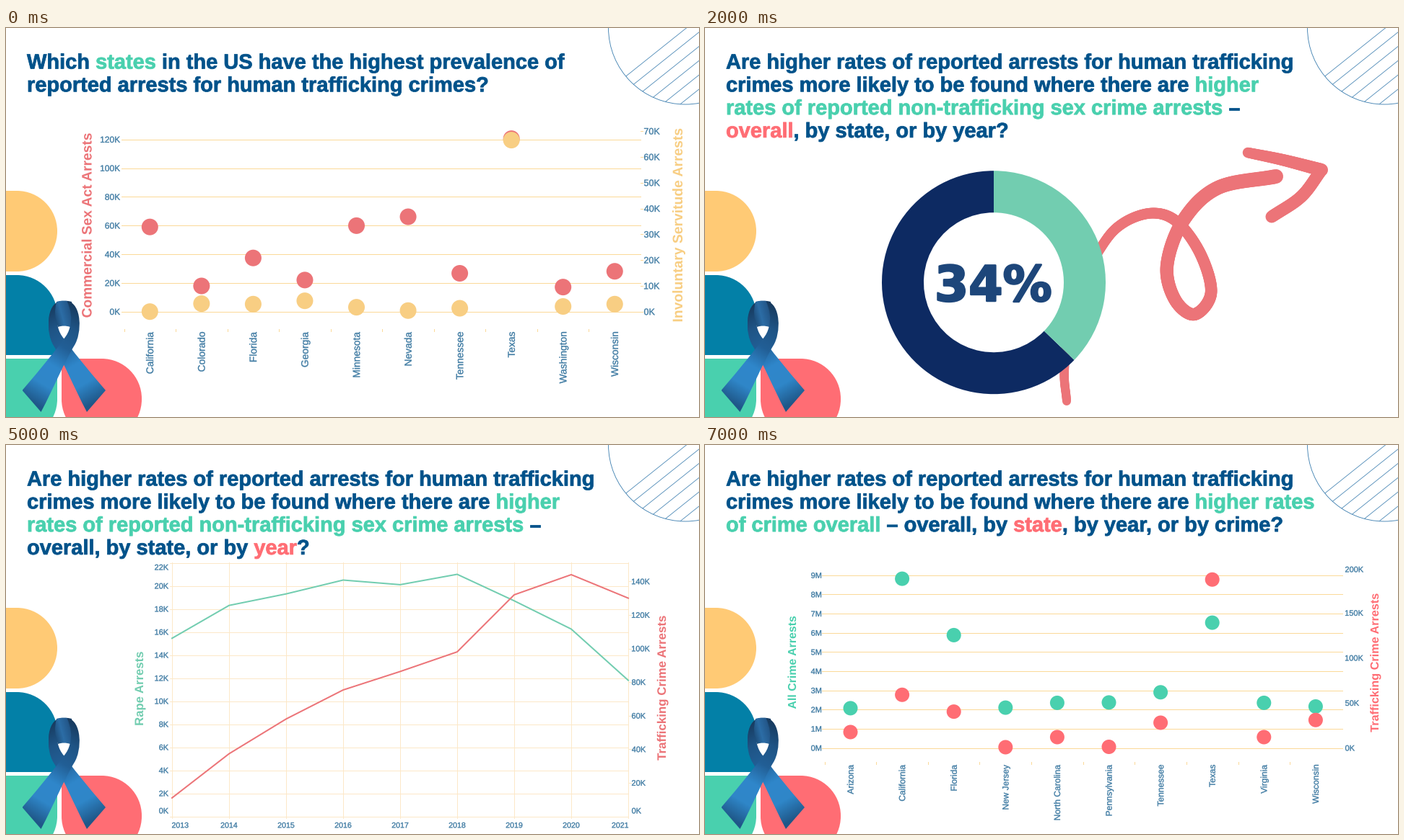
These frames come from a looping animation (960 px wide and 540 px high, 8000 ms). A matplotlib script:

```python
import matplotlib.pyplot as plt
import numpy as np
from matplotlib.animation import FuncAnimation
from matplotlib.collections import LineCollection
from matplotlib.colors import LinearSegmentedColormap
from matplotlib.lines import Line2D
from matplotlib.patches import Circle, PathPatch, Wedge
from matplotlib.path import Path
from matplotlib.textpath import TextPath
from matplotlib.transforms import Affine2D

W, H, DPI = 960, 540, 100
PX = 72 / DPI  # points per pixel

NAVY, GREEN, CORAL = "#00528a", "#49d0ae", "#ff6d74"
YELLOW, TEAL = "#ffca75", "#0380a7"
SOFT_GREEN, SOFT_CORAL, SOFT_YELLOW = "#72cdb0", "#ec7478", "#f8ce83"
INK, GRID, PALE, THIN = "#3f7ba3", "#fbd998", "#fce8c8", "#4584b3"

# arrests in thousands, all crimes in millions
TRAFFICKING = {"Arizona": 17.6, "California": 59, "Colorado": 21,
               "Florida": 40.3, "Georgia": 26.2, "Minnesota": 61.6,
               "Nevada": 66.5, "New Jersey": 0.8, "North Carolina": 12,
               "Pennsylvania": 1.2, "Tennessee": 28, "Texas": 187,
               "Virginia": 12, "Washington": 19.1, "Wisconsin": 31}
INVOLUNTARY = {"California": 0, "Colorado": 3.1, "Florida": 2.9,
               "Georgia": 4.2, "Minnesota": 1.7, "Nevada": 0.4,
               "Tennessee": 1.3, "Texas": 66.5, "Washington": 2,
               "Wisconsin": 2.9}
SEX_CRIMES = {"Arizona": 13.3, "California": 91, "Colorado": 8.2,
              "Florida": 36.7, "Georgia": 19.4, "Minnesota": 13.3,
              "Nevada": 10.3, "Tennessee": 8.2, "Texas": 39.7,
              "Wisconsin": 22.2}
ALL_CRIMES = {"Arizona": 2.07, "California": 8.82, "Florida": 5.88,
              "New Jersey": 2.1, "North Carolina": 2.35,
              "Pennsylvania": 2.37, "Tennessee": 2.9, "Texas": 6.53,
              "Virginia": 2.35, "Wisconsin": 2.16}
YEARS = np.arange(9)
YEARLY = np.array([11, 37.3, 58, 75.3, 86.3, 98, 132, 144, 130])
RAPE = np.array([15.45, 18.3, 19.3, 20.5, 20.1, 21, 18.7, 16.25, 11.8])

fig = plt.figure(figsize=(W / DPI, H / DPI), dpi=DPI, facecolor="white")
ax = fig.add_axes([0, 0, 1, 1])
ax.set_xlim(0, W)
ax.set_ylim(H, 0)
ax.set_autoscale_on(False)
ax.axis("off")

layer = []


def add(artist):
    ax.add_artist(artist)
    layer.append(artist)
    return artist


# ---------- text ----------
def glyphs(s, size, bold, family="Liberation Sans"):
    weight = "bold" if bold else "normal"
    return TextPath((0, 0), s, size=size,
                    prop={"family": family, "weight": weight})


def place(path, x, y, color, ha=0.0, turn=False, stroke=0.0):
    """Baseline at y (at x when turned); ha is 0 for start, 1 for end."""
    x0, x1 = path.get_extents().intervalx
    t = Affine2D().translate(-x0 - ha * (x1 - x0), 0).scale(1, -1)
    if turn:
        t.rotate_deg(-90)
    t.translate(x, y)
    add(PathPatch(t.transform_path(path), fc=color, ec=color,
                  lw=stroke * PX, joinstyle="round", zorder=4))


def label(s, x, y, size, ha=0.0):
    place(glyphs(s, size, False), x, y + 0.36 * size, INK, ha, stroke=0.35)


def axis_title(s, x, y, size, color):
    place(glyphs(s, size, True), x, y, color, ha=0.5, turn=True)


def title(*lines):
    """Pieces between bars are coloured by their first letter."""
    size = 29
    for row, text in enumerate(lines):
        done = ""
        for i, piece in enumerate(text.split("|")):
            color = NAVY
            if i % 2:
                color = {"g": GREEN, "r": CORAL}[piece[0]]
                piece = piece[1:]
            done += piece
            if piece.strip():
                right = glyphs(done, size, True).get_extents().x1
                place(glyphs(piece, size, True), 29 + right,
                      56.5 + 31.8 * row, color, ha=1, stroke=0.8)


# ---------- shapes ----------
def line(xs, ys, color, width=1.0, zorder=1):
    return add(Line2D(xs, ys, color=color, lw=width * PX, zorder=zorder))


def outline(verts, codes):
    return Path(verts, [{"M": 1, "L": 2, "Q": 3, "C": 4}[c] for c in codes])


def gradient(path, colors, start, end):
    """Fill a path with a linear gradient running from start to end."""
    box = path.get_extents()
    gx, gy = np.meshgrid(np.linspace(box.x0, box.x1, 90),
                         np.linspace(box.y0, box.y1, 120))
    d = np.subtract(end, start)
    v = ((gx - start[0]) * d[0] + (gy - start[1]) * d[1]) / (d @ d)
    im = ax.imshow(v, extent=(box.x0, box.x1, box.y1, box.y0), vmin=0, vmax=1,
                   aspect="auto", interpolation="bilinear",
                   cmap=LinearSegmentedColormap.from_list("", colors))
    im.set_clip_path(PathPatch(path, transform=ax.transData))
    im.set_zorder(3)


def petal(x0, y0, x1, y1, corners, color, r=56):
    """Rectangle with the named corners rounded."""
    k = r * 0.4477
    rule = [("tl", (x0, y0), (0, 1), (1, 0)), ("tr", (x1, y0), (-1, 0), (0, 1)),
            ("br", (x1, y1), (0, -1), (-1, 0)), ("bl", (x0, y1), (1, 0), (0, -1))]
    verts, codes = [], ""
    for name, p, a, b in rule:
        p, a, b = np.array(p), np.array(a), np.array(b)
        if name in corners:
            verts += [p + a * r, p + a * k, p + b * k, p + b * r]
            codes += "LCCC"
        else:
            verts.append(p)
            codes += "L"
    add(PathPatch(outline(verts, "M" + codes[1:]), fc=color, lw=0))


def spline(points, n=24):
    p = np.array(points, float)
    p = np.vstack([2 * p[0] - p[1], p, 2 * p[-1] - p[-2]])
    t = np.linspace(0, 1, n, endpoint=False)[:, None]
    out = [0.5 * (2 * b + (c - a) * t + (2 * a - 5 * b + 4 * c - d) * t**2
                  + (3 * b - a - 3 * c + d) * t**3)
           for a, b, c, d in zip(p, p[1:], p[2:], p[3:])]
    return np.vstack(out + [p[-2:-1]])


def brush(points, w0, w1):
    """Round stroke whose width runs from w0 to w1."""
    p = spline(points)
    add(LineCollection(np.stack([p[:-1], p[1:]], axis=1),
                       linewidths=np.linspace(w0, w1, len(p) - 1) * PX,
                       colors=SOFT_CORAL, capstyle="round"))


# ---------- backdrop ----------
def ribbon():
    side = np.array([(138, 503), (112, 533), (94, 499), (80, 464), (66, 441),
                     (55, 424), (55, 382), (76, 379), (67, 398), (72, 415),
                     (74, 424), (80, 431), (96, 454), (138, 503)])
    codes = "MLCCCCCCQQQQQL"
    shades = ["#173a5e", "#1f5485", "#225f96", "#2f87cb", "#2f86c8", "#1f5788"]
    gradient(outline(side, codes), shades, (60, 385), (134, 514))
    top = outline([(70, 380), (80, 377), (91, 380), (95, 400), (89, 415),
                   (80, 412), (72, 415), (65, 398), (70, 380)], "MQQQQQQQQ")
    gradient(top, ["#1d4c78", "#2c6da6", "#24598c", "#163759"],
             (66, 398), (97, 390))
    mirrored = side * (-1, 1) + (160.5, 0)
    gradient(outline(mirrored, codes), shades, (102, 388), (25, 514))


def backdrop():
    petal(-97, 226, 71, 338, ("tr", "br"), YELLOW)
    petal(-97, 343, 71, 454, ("tr",), TEAL)
    petal(-97, 459, 71, 571, ("br",), GREEN)
    petal(77, 459, 188, 571, ("tr", "br", "bl"), CORAL, 55.5)
    ring = add(Circle((941, -0.5), 106.5, fill=False, ec=THIN, lw=0.9 * PX))
    for k in range(6):
        y = -14 + 19.8 * k
        line([840, 960], [y + 96, y], THIN, 0.8).set_clip_path(ring)
    ribbon()


# ---------- charts ----------
def scale(zero, unit):
    """Map a value to its height on the stage."""
    return lambda v: zero - np.asarray(v) * unit


def axis(values, to_y, x, ha, size, unit="K", lo=0, hi=H):
    for v in values:
        label(f"{v}{unit}", x, np.clip(to_y(v), lo, hi), size, ha)


def rows(ys, x0, x1, color=GRID):
    for y in ys:
        line([x0, x1], [y, y], color)


def dot_chart(names, x0, step, series, r, top, size):
    """Series are (colour, values by state, scale)."""
    for i, name in enumerate(names):
        x = x0 + step * i
        line([x - step / 2] * 2, [top - 4, top - 1.5], GRID)
        for color, values, to_y in series:
            add(Circle((x, to_y(values[name])), r, fc=color, lw=0, zorder=2))
        place(glyphs(name, size, False), x + 0.34 * size, top, INK, ha=1,
              turn=True, stroke=0.35)


def year_chart(x0, x1, y0, y1, grid, series, label_y):
    xs = np.linspace(x0, x1, len(YEARS))
    rows(grid, x0 - 3, x1, PALE)
    for i, x in enumerate(xs):
        line([x, x], [y0, y1], PALE)
        # the outer labels stay inside the chart
        ha = 0 if x == x0 else 1 if x == x1 else 0.5
        label(str(2013 + i), x, label_y, 10.6, ha)
    for color, values, to_y in series:
        line(xs, to_y(values), color, 2, 2)


commercial_y, involuntary_y = scale(393.7, 1.992), scale(393.7, 3.58)


def arrest_chart(topic):
    title(f"Which |g{topic}| in the US have the highest prevalence of",
          "reported arrests for human trafficking crimes?")
    axis_title("Commercial Sex Act Arrests", 118.5, 274, 19.2, SOFT_CORAL)
    axis_title("Involuntary Servitude Arrests", 937, 273.5, 19.3, SOFT_YELLOW)
    axis(range(0, 121, 20), commercial_y, 158, 1, 12)
    axis(range(0, 71, 10), involuntary_y, 884, 0, 12.6)
    rows(involuntary_y(range(0, 71, 10)), 879, 882)


def arrests_by_state():
    arrest_chart("states")
    rows(commercial_y(range(0, 121, 20)), 160, 879)
    commercial = {s: TRAFFICKING[s] - v for s, v in INVOLUNTARY.items()}
    dot_chart(INVOLUNTARY, 199.3, 71.55,
              [(SOFT_CORAL, commercial, commercial_y),
               (SOFT_YELLOW, INVOLUNTARY, involuntary_y)], 11.5, 422, 13.8)


def arrests_by_year():
    arrest_chart("years")
    forced = YEARLY * (0.2 + 0.02 * YEARS)
    year_chart(163, 879, 143, 393.5, commercial_y(range(0, 121, 20)),
               [(SOFT_CORAL, YEARLY - forced, commercial_y),
                (SOFT_YELLOW, forced, involuntary_y)], 412)


def donut(percent, angle):
    brush([(501, 518), (498, 470), (510, 380), (549, 304), (579, 271),
           (620, 257), (655, 270), (687, 315), (701, 368), (678, 397.5),
           (651, 377), (640, 330), (662, 268), (710, 222), (791, 206)], 12, 20)
    brush([(752, 173), (800, 183), (854, 197)], 14.5, 18)
    brush([(854, 197), (826, 234), (785, 262)], 17, 17)
    add(Circle((400, 353.2), 100, fc="white", lw=0, zorder=2))
    for a, b, color in ((angle, 360, "#0d2a62"), (0, angle, SOFT_GREEN)):
        add(Wedge((400, 353.2), 155, a - 90, b - 90, width=58, fc=color,
                  lw=0, zorder=2))
    place(glyphs(percent, 68, True, "DejaVu Sans"), 400.5, 379, "#1d467a",
          ha=0.5, stroke=2.5)


RATES = ["Are higher rates of reported arrests for human trafficking",
         "crimes more likely to be found where there are |ghigher"]


def sex_crime_title(tail):
    title(*RATES, "|grates of reported non-trafficking sex crime arrests| \u2013",
          tail)


def crime_title(tail):
    title(RATES[0], RATES[1] + " rates", "|gof crime overall| \u2013 " + tail)


def sex_crimes_overall():
    sex_crime_title("|roverall|, by state, or by year?")
    donut("34%", 134)


def sex_crimes_by_state():
    sex_crime_title("overall, by |rstate|, or by year?")
    axis_title("All Non-trafficking Sex Crime Arrests", 206, 311, 16.7, SOFT_GREEN)
    axis_title("Trafficking Crime Arrests", 921, 311, 19, SOFT_CORAL)
    left, right = scale(459.5, 2.97), scale(459.5, 1.45)
    rows(left(range(0, 81, 20)), 252, 863)
    axis(range(0, 81, 20), left, 249, 1, 12.4, hi=450.5)
    axis(range(0, 201, 50), right, 867, 0, 12.7, lo=173, hi=450.5)
    rows(right(range(50, 201, 50)), 862, 865)
    dot_chart(SEX_CRIMES, 285, 60.72,
              [(SOFT_GREEN, SEX_CRIMES, left),
               (SOFT_CORAL, TRAFFICKING, right)], 11.5, 464, 13.7)


def sex_crimes_by_year(name, step, values):
    sex_crime_title("overall, by state, or by |ryear|?")
    axis_title(name, 190, 338, 16.7, SOFT_GREEN)
    axis_title("Trafficking Crime Arrests", 914, 337.5, 16.9, SOFT_CORAL)
    left, right = scale(515.5, 32 / step), scale(515.5, 2.33)
    marks = range(0, 11 * step + 1, step)
    axis(marks, left, 225, 1, 11, lo=169.5, hi=507.5)
    axis(range(0, 141, 20), right, 867, 0, 11, hi=507.5)
    rows(right(range(20, 141, 20)), 862, 866, PALE)
    year_chart(230, 862, 163, 518, left(marks),
               [(SOFT_GREEN, values, left), (SOFT_CORAL, YEARLY, right)], 527.5)


def all_sex_crimes_by_year():
    sex_crimes_by_year("All Non-trafficking Sex Crime Arrests", 5, RAPE * 2.4)


def rape_by_year():
    sex_crimes_by_year("Rape Arrests", 2, RAPE)


def crimes_overall():
    crime_title("|roverall|, by state, by year, or by crime?")
    donut("26%", 90)


def crimes_by_state():
    crime_title("overall, by |rstate|, by year, or by crime?")
    axis_title("All Crime Arrests", 126, 302, 15.9, GREEN)
    axis_title("Trafficking Crime Arrests", 933, 302.5, 16.2, CORAL)
    left, right = scale(420.5, 26.63), scale(420.5, 1.25)
    rows(left(range(10)), 162, 883)
    axis(range(10), left, 161, 1, 11, "M")
    axis(range(0, 201, 50), right, 887, 0, 11, lo=172.5)
    dot_chart(ALL_CRIMES, 201.5, 71.6,
              [(GREEN, ALL_CRIMES, left), (CORAL, TRAFFICKING, right)],
              10, 444, 12)


backdrop()
scenes = []
for build in (arrests_by_state, arrests_by_year, sex_crimes_overall,
              sex_crimes_by_state, all_sex_crimes_by_year, rape_by_year,
              crimes_overall, crimes_by_state):
    layer = []
    build()
    scenes.append(layer)


def show(frame):
    for i, scene in enumerate(scenes):
        for artist in scene:
            artist.set_visible(i == frame)
    return []


show(0)
anim = FuncAnimation(fig, show, frames=len(scenes), interval=1000,
                     repeat=True, repeat_delay=0, blit=False)
plt.show()
```
